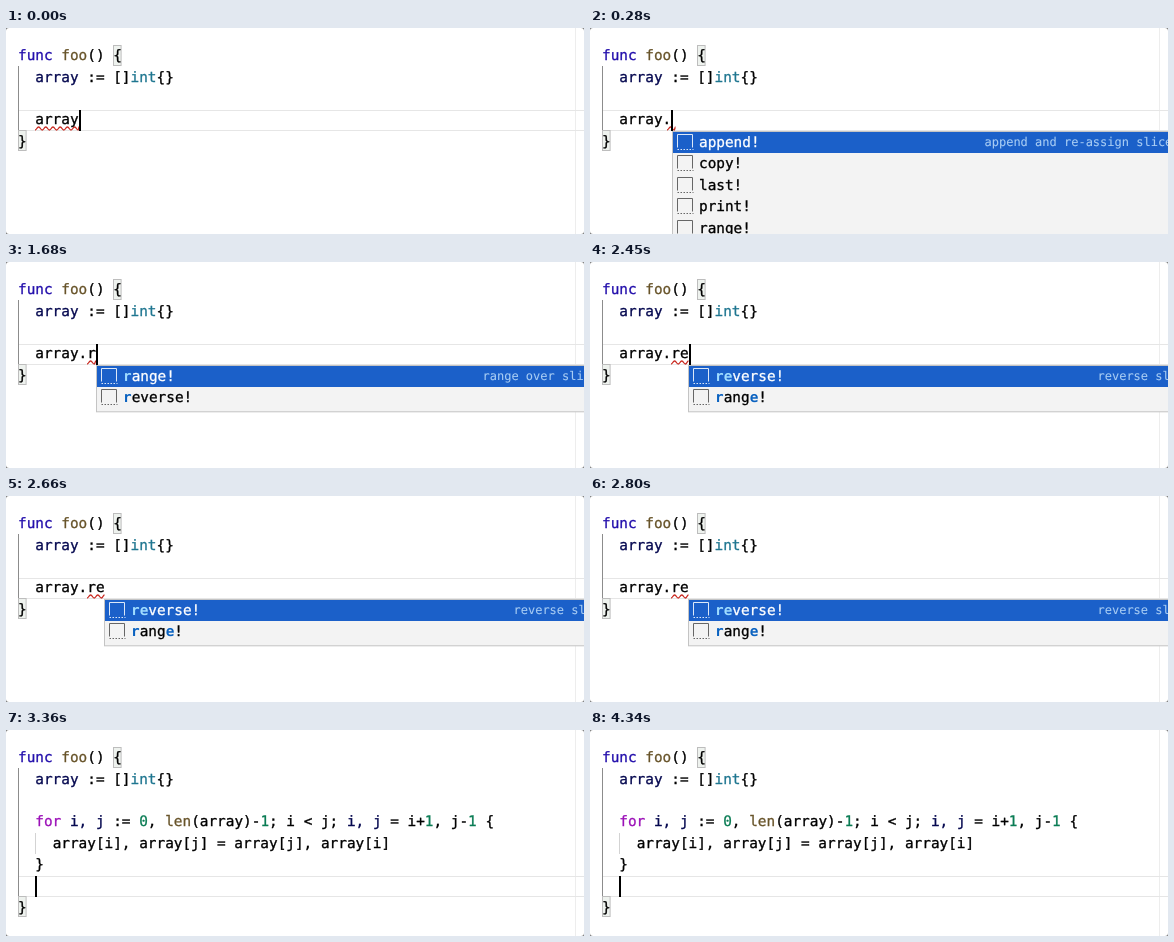
These frames come from a looping animation (578 by 206 pixels, 4.48 s). An HTML page:

```html
<!DOCTYPE html>
<html lang="en">
<head>
<meta charset="utf-8">
<title>Slice completion</title>
<style>
  html, body { margin: 0; width: 100%; height: 100%; overflow: hidden; background: #777; }
  svg { display: block; width: 578px; height: 206px; }
  text {
    font: 14.38px "DejaVu Sans Mono", monospace;
    text-rendering: geometricPrecision;
    white-space: pre;
  }
  text, tspan { fill: currentColor; stroke: currentColor; stroke-width: .3px; }
  .detail { font-size: 12px; color: #a9cdf4; stroke-width: .1px; }
  .match { font-weight: bold; color: #0a62c0; stroke-width: 0; }
  .selected { color: #fff; }
  .selected .match { color: #9fdcff; }
</style>
</head>
<body>
<svg id="stage" viewBox="0 0 578 206"></svg>
<script>
const LOOP = 4480, LEFT = 12, CHAR = 8.66, TOP = 17.6, ROW = 21.4;
const KEYWORD = '#2410ac', FLOW = '#9c12b8', NAME = '#060950', FUNC = '#68542a',
      TYPE = '#1f7690', NUM = '#0a7c54', INK = '#000';
const colX = col => LEFT + col * CHAR;
const rowY = row => TOP + row * ROW;

const rect = (x, y, w, h, fill, extra = '') =>
  `<rect x="${x}" y="${y}" width="${w}" height="${h}" fill="${fill}" ${extra}/>`;

// Tokens alternate between colour and text.
function code(row, col, ...tokens) {
  let spans = '';
  for (let i = 0; i < tokens.length; i += 2)
    spans += `<tspan style="color:${tokens[i]}">${tokens[i + 1]}</tspan>`;
  return `<text x="${colX(col)}" y="${rowY(row) + 14.65}">${spans}</text>`;
}

const bracketBox = (row, col) =>
  rect(Math.round(colX(col)) + .5, Math.round(rowY(row)) - .5, 7.6, 20, '#eef2ee', 'stroke="#bdbdbd"');

function squiggle(x, end) {
  let d = `M${x} 102`;
  for (let up = true; x < end; up = !up) {
    const step = Math.min(3.6, end - x);
    d += `c${step / 2} 0 ${step / 2} ${up ? -3 : 3} ${step} ${up ? -3 : 3}`;
    x += step;
  }
  return `<path d="${d}" fill="none" stroke="#c9281f" stroke-width="1.3"/>`;
}

// Marks the typed letters in order of appearance.
function mark(label, typed) {
  let n = 0;
  return [...label].map(c => c === typed[n] ? (n++, `<tspan class="match">${c}</tspan>`) : c).join('');
}

function popup({ x, typed, items, detail, detailX }) {
  let out = rect(x + .5, 103.5, 600, items.length * ROW + 3.5, '#f3f3f3', 'stroke="#c4c4c4"');
  out += rect(x + 1, 104, 600, 21, '#1b60c9');
  items.forEach((label, i) => {
    const y = 104 + i * ROW, ix = x + 5.5, iy = Math.round(y + 2) + .5;
    const stroke = i ? '#666' : '#dce8f8';
    out += `<path d="M${ix} ${iy + 13}V${iy}h15v13" fill="none" stroke="${stroke}"/>` +
      `<path d="M${ix} ${iy + 15}h16" stroke="${stroke}" stroke-dasharray="1.5 1.5"/>` +
      `<text class="${i ? '' : 'selected'}" x="${x + 27}" y="${y + 14.9}">${mark(label, typed)}</text>`;
  });
  return out + `<text class="detail" x="${detailX}" y="118">${detail}</text>`;
}

const phases = [
  { from: 0, text: 'array', wave: [29, 73] },
  { from: 210, text: 'array.', wave: [77, 85.5] },
  { from: 280, text: 'array.', wave: [77, 85.5], list: {
    x: 82, typed: '', items: ['append!', 'copy!', 'last!', 'print!', 'range!'],
    detail: 'append and re-assign slice', detailX: 394.5 } },
  { from: 1610, text: 'array.r', wave: [81, 90], list: {
    x: 90, typed: 'r', items: ['range!', 'reverse!'], detail: 'range over slice', detailX: 476.5 } },
  { from: 1960, text: 'array.re', wave: [81, 98.5], list: {
    x: 98, typed: 're', items: ['reverse!', 'range!'], detail: 'reverse slice', detailX: 507.5 } },
  { from: 3290, done: true }
];
const blinks = [[770, 1260], [2520, 3010], [3850, 4340]];

const loopCode = () =>
  code(3, 2, FLOW, 'for', NAME, ' i, j', INK, ' := ', NUM, '0', INK, ', ', FUNC, 'len', INK, '(array)-',
    NUM, '1', INK, '; i &lt; j; ', NAME, 'i, j', INK, ' = i+', NUM, '1', INK, ', j-', NUM, '1', INK, ' {') +
  code(4, 4, INK, 'array[i], array[j] = array[j], array[i]') +
  code(5, 2, INK, '}') + rect(29, 103, 1, 21, '#d3d3d3');

function draw({ done, text, wave, list }, caretOn) {
  const row = done ? 6 : 3, y = Math.round(rowY(row));
  const caretX = done ? 29 : Math.round(colX(2 + text.length));
  return rect(0, 0, 578, 206, '#fff', 'rx="3"') +
    rect(569, 0, 1, 206, '#ededed') +
    rect(13, y, 565, 1, '#e6e6e6') + rect(13, y + 20, 565, 1, '#e6e6e6') +
    rect(12, 38, 1, y - 17, '#8c8c8c') +
    bracketBox(0, 11) + bracketBox(row + 1, 0) +
    code(0, 0, KEYWORD, 'func', FUNC, ' foo', INK, '() {') +
    code(1, 2, NAME, 'array', INK, ' := []', TYPE, 'int', INK, '{}') +
    code(row + 1, 0, INK, '}') +
    (done ? loopCode() : squiggle(...wave) + code(3, 2, INK, text)) +
    (caretOn ? rect(caretX, y, 2, 21, INK) : '') +
    (list ? popup(list) : '');
}

const stage = document.getElementById('stage');
const start = performance.now();
let shown = '';
function tick() {
  const t = (performance.now() - start) % LOOP;
  const index = phases.findLastIndex(p => t >= p.from);
  const caretOn = !blinks.some(([off, on]) => t >= off && t < on);
  const key = index + ' ' + caretOn;
  if (key !== shown) {
    shown = key;
    stage.innerHTML = draw(phases[index], caretOn);
  }
  requestAnimationFrame(tick);
}
tick();
</script>
</body>
</html>
```
